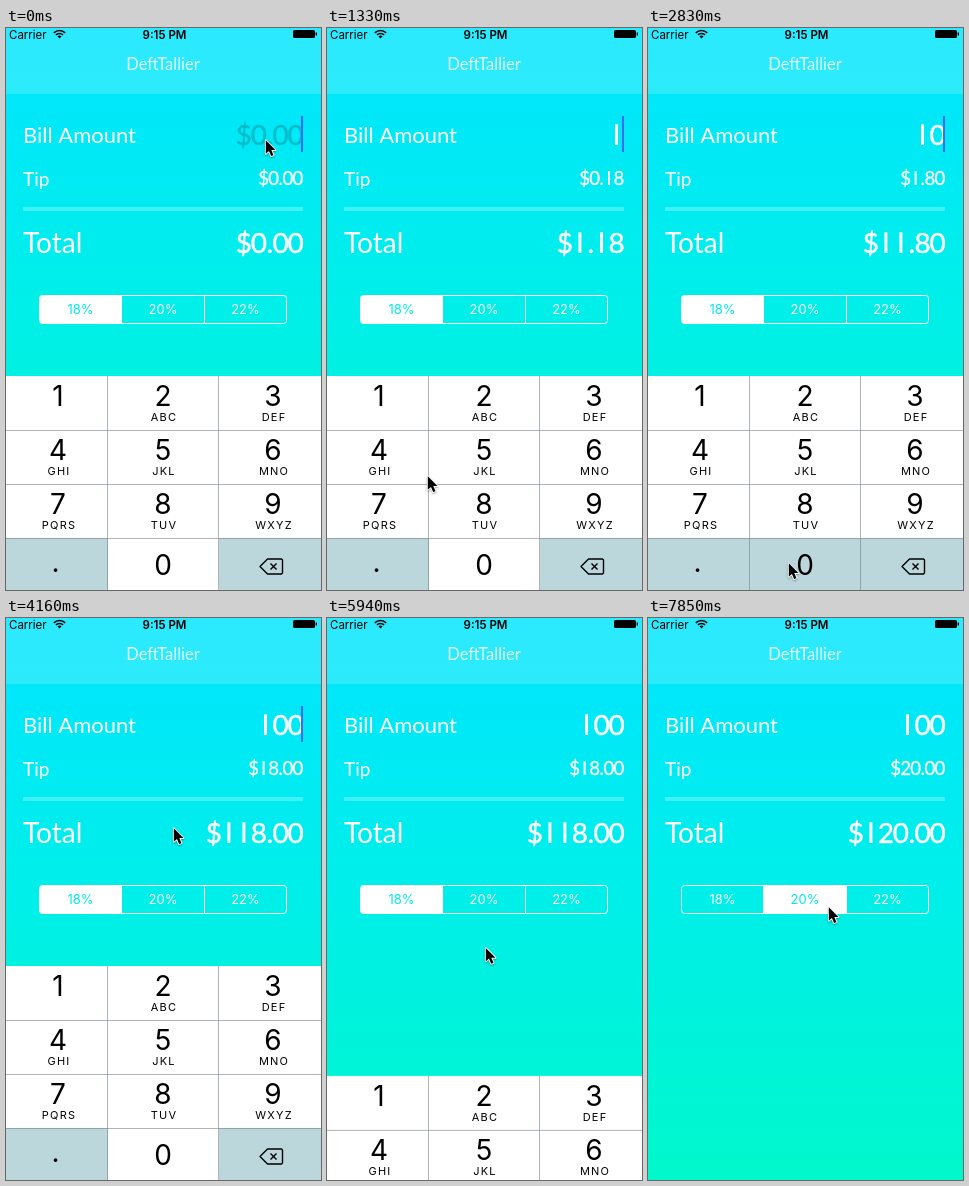
Animation of 315 by 562 pixels, one loop 8000 ms. Source, as an HTML page with a canvas:

```html
<!DOCTYPE html>
<html lang="en">
<head>
<meta charset="utf-8">
<title>Tip calculator</title>
<style>
html, body { margin: 0; width: 100%; height: 100%; overflow: hidden; background: #00e8f4; }
canvas { display: block; width: 315px; height: 562px; }
</style>
</head>
<body>
<canvas id="stage"></canvas>
<script>
const W = 315, H = 562, LOOP = 8000, STEP = LOOP / 54;
const HUMANIST = 'Lato, sans-serif', SYSTEM = 'Inter, sans-serif';
const KEY_GRAY = '#bbd7db';

const canvas = document.getElementById('stage');
const dpr = window.devicePixelRatio || 1;
canvas.width = W * dpr;
canvas.height = H * dpr;
const ctx = canvas.getContext('2d');
ctx.scale(dpr, dpr);

const white = a => `rgba(255,255,255,${a})`;
const clamp = v => Math.max(0, Math.min(1, v));
const smooth = p => p * p * (3 - 2 * p);

const background = ctx.createLinearGradient(0, 0, 0, H);
background.addColorStop(0, '#00e5ff');
background.addColorStop(0.5, '#00efe9');
background.addColorStop(1, '#00f8cb');

// Pointer stops: time, x, y
const pointerPath = [
  [0, 259, 112], [740, 71, 381], [1185, 71, 381], [1333, 100, 448],
  [1925, 140, 535], [3420, 140, 535], [4148, 167, 210], [4600, 162, 291],
  [4740, 162, 292], [4900, 162, 292], [5330, 159, 337], [5630, 158, 334],
  [5780, 158, 334], [6510, 158, 292], [7410, 158, 292], [7850, 180, 289]
];

const caretOff = [[440, 1030], [1770, 2215], [3550, 4060], [4560, 5030], [5550, LOOP]];
const presses = [['1', 1030, 1180], ['0', 2365, 2510], ['0', 2810, 2955]];
const SEGMENT_DOWN = 6810, SEGMENT_UP = 6960, DISMISS = 5860;

const within = (t, a, b) => t >= a && t < b;

function pointerAt(t) {
  let i = 0;
  while (i < pointerPath.length - 1 && pointerPath[i + 1][0] <= t) i++;
  const a = pointerPath[i], b = pointerPath[i + 1];
  if (!b) return a.slice(1);
  const p = smooth((t - a[0]) / (b[0] - a[0]));
  return [a[1] + (b[1] - a[1]) * p, a[2] + (b[2] - a[2]) * p];
}

function text(str, x, y, font, color, align = 'left') {
  ctx.font = font;
  ctx.fillStyle = color;
  ctx.textAlign = align;
  ctx.fillText(str, x, y);
}

function rect(x, y, w, h, color) {
  ctx.fillStyle = color;
  ctx.fillRect(x, y, w, h);
}

function line(points, color, width, close) {
  ctx.beginPath();
  points.forEach(([x, y]) => ctx.lineTo(x, y));
  if (close) ctx.closePath();
  ctx.strokeStyle = color;
  ctx.lineWidth = width;
  ctx.stroke();
}

// Tabular figures, half an em each, slightly emboldened, with a plain bar for the one
function figures(str, right, y, em, color) {
  const advance = c => em * (c === '.' ? 0.22 : 0.5);
  const bar = em * 0.1, height = em * 0.69;
  let x = right;
  ctx.strokeStyle = color;
  ctx.lineWidth = em * 0.016;
  for (const c of [...str].reverse()) {
    const w = advance(c), mid = x - w / 2;
    if (c === '1') {
      rect(mid - bar / 2, y - height, bar, height, color);
    } else {
      text(c, mid, y, `${em * 0.93}px ${HUMANIST}`, color, 'center');
      ctx.strokeText(c, mid, y);
    }
    x -= w;
  }
}

function statusBar() {
  text('Carrier', 3, 10.5, `11.5px ${SYSTEM}`, '#000');
  text('9:15 PM', 158.5, 10.5, `600 11.5px ${SYSTEM}`, '#000', 'center');
  const from = -Math.PI * 0.75, to = -Math.PI * 0.25;
  ctx.strokeStyle = ctx.fillStyle = '#000';
  ctx.lineWidth = 1.7;
  for (const r of [5, 8]) {
    ctx.beginPath();
    ctx.arc(53.5, 10.5, r, from, to);
    ctx.stroke();
  }
  ctx.beginPath();
  ctx.moveTo(53.5, 10.5);
  ctx.arc(53.5, 10.5, 2.8, from, to);
  ctx.fill();
  ctx.beginPath();
  ctx.roundRect(287, 2, 22, 8, 1.5);
  ctx.fill();
  rect(309.6, 4.5, 1.4, 3, '#000');
}

function segments(t) {
  const edges = [33.5, 115.5, 198.5, 280.5];
  const chosen = t < SEGMENT_UP ? 0 : 1;
  const held = within(t, SEGMENT_DOWN, SEGMENT_UP);
  ctx.save();
  ctx.beginPath();
  ctx.roundRect(33.5, 267.5, 247, 28, 3);
  ctx.strokeStyle = '#fff';
  ctx.lineWidth = 1;
  ctx.stroke();
  ctx.clip();
  ['18%', '20%', '22%'].forEach((label, i) => {
    const x = edges[i], w = edges[i + 1] - x;
    if (i === chosen) rect(x, 267, w, 29, '#fff');
    else if (i === 1 && held) rect(x, 267, w, 29, white(0.25));
    if (i) line([[x, 267], [x, 296]], '#fff', 1);
    text(label, x + w / 2, 286, `13px ${SYSTEM}`, i === chosen ? '#00e9ee' : '#fff', 'center');
  });
  ctx.restore();
}

function form(t) {
  const typed = t < 1180 ? '' : t < 2510 ? '1' : t < 2955 ? '10' : '100';
  const tip = Number(typed) * (t < SEGMENT_UP ? 0.18 : 0.2);
  const money = v => '$' + v.toFixed(2);

  text('Bill Amount', 17, 115, `22px ${HUMANIST}`, '#fff');
  text('Tip', 17, 158, `19px ${HUMANIST}`, '#fff');
  text('Total', 17, 224.5, `28px ${HUMANIST}`, '#fff');
  figures(typed || '$0.00', 297, 117, 30, typed ? '#fff' : '#00bdcc');
  figures(money(tip), 297, 157, 20, '#fff');
  figures(money(Number(typed) + tip), 297, 225, 30, '#fff');
  rect(17, 179, 280, 4, white(0.25));
  if (!caretOff.some(([a, b]) => within(t, a, b))) rect(295, 88, 2, 36, '#426bf2');
}

function keypad(t) {
  const p = clamp((t - DISMISS) / 400);
  if (p === 1) return;
  const down = presses.find(([, a, b]) => within(t, a, b));
  const left = [0, 102, 213, W], centers = [52, 157, 267];
  const keys = ['1', '2 ABC', '3 DEF', '4 GHI', '5 JKL', '6 MNO',
    '7 PQRS', '8 TUV', '9 WXYZ', '.', '0', 'back'];

  ctx.save();
  ctx.translate(0, 214 * (1 - (1 - p) ** 4));
  rect(0, 348, W, 214, '#fff');
  keys.forEach((key, i) => {
    const col = i % 3, row = Math.floor(i / 3), y = 348 + row * 54, x = centers[col];
    const [digit, letters] = key.split(' ');
    const gray = digit === '.' || digit === 'back' || (down && down[0] === digit);
    if (gray) rect(left[col], y, left[col + 1] - left[col], 54, KEY_GRAY);
    if (digit === 'back') return backspace();
    const base = digit === '.' ? 544 : row === 3 ? 547 : y + 30;
    text(digit, digit === '.' ? 49.5 : x, base, `28px ${SYSTEM}`, '#000', 'center');
    if (letters) {
      ctx.letterSpacing = '1.2px';
      text(letters, x + 1, y + 45, `11px ${SYSTEM}`, '#000', 'center');
      ctx.letterSpacing = '0px';
    }
  });
  const rule = 'rgba(120,130,135,.6)';
  for (const y of [402.5, 456.5, 510.5]) line([[0, y], [W, y]], rule, 1);
  for (const x of [101.5, 212.5]) line([[x, 348], [x, H]], rule, 1);
  ctx.restore();
}

function backspace() {
  ctx.lineJoin = 'round';
  line([[254, 538.5], [261.5, 531], [275.5, 531], [276.5, 532], [276.5, 545], [275.5, 546], [261.5, 546]], '#000', 1.4, true);
  line([[264.5, 535.5], [270.5, 541.5]], '#000', 1.4);
  line([[270.5, 535.5], [264.5, 541.5]], '#000', 1.4);
}

function pointer([x, y]) {
  const shape = [[0, 0], [0, 14.5], [3.4, 11.4], [5.8, 17], [8.3, 16], [5.9, 10.5], [10.4, 10.5]];
  ctx.save();
  ctx.translate(x + 0.8, y + 0.3);
  ctx.scale(0.93, 0.93);
  ctx.lineJoin = 'round';
  ctx.shadowColor = 'rgba(0,0,0,.35)';
  ctx.shadowBlur = 2 * dpr;
  ctx.shadowOffsetY = dpr;
  line(shape, '#fff', 2, true);
  ctx.shadowColor = 'transparent';
  ctx.fillStyle = '#000';
  ctx.fill();
  ctx.restore();
}

function draw(t) {
  rect(0, 0, W, H, background);
  rect(0, 0, W, 66, white(0.17));
  statusBar();
  text('DeftTallier', 157, 42, `16.5px ${HUMANIST}`, white(0.85), 'center');
  form(t);
  segments(t);
  keypad(t);
  pointer(pointerAt(t));
}

function tick() {
  const t = performance.now() % LOOP;
  draw(Math.floor((t + 10) / STEP) % 54 * STEP);
  requestAnimationFrame(tick);
}
tick();
</script>
</body>
</html>
```
